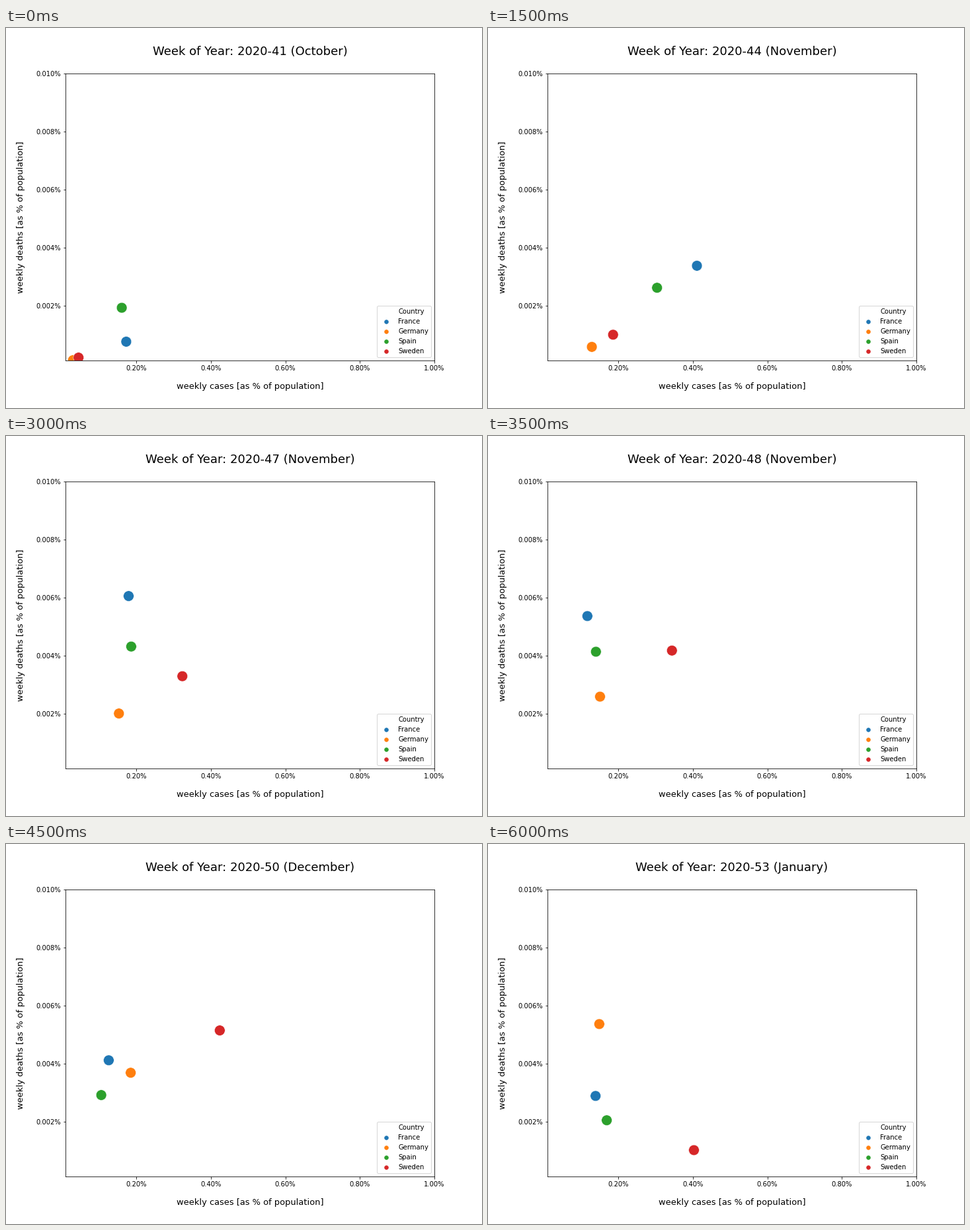
Write a matplotlib script that moves like this. It is 720 by 576 pixels and loops after 6500 ms.

```python
import numpy as np
import matplotlib.pyplot as plt
from matplotlib.animation import FuncAnimation
from matplotlib.ticker import FormatStrFormatter

plt.rcParams["font.family"] = "DejaVu Sans"

FIRST_WEEK, WEEKS = 41, 13
MONTH_STARTS = {0: "October", 3: "November", 8: "December", 12: "January"}
EDGE = .48

# Key points of each path: cases in %, deaths in thousandths of a %
KEY_WEEKS = [0, 3, 5, 7, 9, 11, 12]
PATHS = {
    "France": ([.173, .411, .290, .117, .126, .133, .139],
               [.75, 3.37, 6.13, 5.36, 4.11, 3.82, 2.88]),
    "Germany": ([.030, .129, .156, .151, .185, .170, .149],
                [.11, .57, 1.44, 2.58, 3.68, 4.64, 5.36]),
    "Spain": ([.161, .304, .246, .140, .106, .128, .169],
              [1.92, 2.61, 4.07, 4.13, 2.91, 1.84, 2.04]),
    "Sweden": ([.045, .186, .295, .344, .424, .382, .403],
               [.20, .99, 2.38, 4.17, 5.14, 2.32, 1.01]),
}
COLORS = ["tab:blue", "tab:orange", "tab:green", "tab:red"]

# key week x country x (cases, deaths); growth is exponential, so use logs
log_keys = np.log(np.array(list(PATHS.values())).transpose(2, 0, 1))
log_slopes = np.gradient(log_keys, KEY_WEEKS, axis=0)


def positions(week):
    """Smooth cubic path through the key points, in log space."""
    i = min(np.searchsorted(KEY_WEEKS, week, side="right"), len(KEY_WEEKS) - 1)
    span = KEY_WEEKS[i] - KEY_WEEKS[i - 1]
    t = (week - KEY_WEEKS[i - 1]) / span
    ease = t * t * (3 - 2 * t)
    level = log_keys[i - 1] * (1 - ease) + log_keys[i] * ease
    bend = log_slopes[i - 1] * (1 - t) - log_slopes[i] * t
    return np.exp(level + span * t * (1 - t) * bend) * [1, .001]


def month(week):
    return MONTH_STARTS[max(start for start in MONTH_STARTS if start <= week)]


fig, ax = plt.subplots(figsize=(10, 8), dpi=72)
fig.subplots_adjust(left=.125, right=.9, bottom=.125, top=.88)

ax.set_xlim(.01, 1)
ax.set_ylim(.0001, .01)
ax.set_xticks(np.arange(1, 6) * .2)
ax.set_yticks(np.arange(1, 6) * .002)
ax.xaxis.set_major_formatter(FormatStrFormatter("%.2f%%"))
ax.yaxis.set_major_formatter(FormatStrFormatter("%.3f%%"))
ax.set_xlabel("weekly cases [as % of population]", fontsize=13, labelpad=16)
ax.set_ylabel("weekly deaths [as % of population]", fontsize=13, labelpad=16)
title = ax.set_title("", fontsize=18, pad=28)

dots = ax.scatter(*positions(0).T, s=250, c=COLORS,
                  edgecolors="white", linewidths=EDGE)

ax.scatter([], [], s=0, color="white", label="Country")
for name, color in zip(PATHS, COLORS):
    ax.scatter([], [], color=color, linewidths=EDGE, label=name)
ax.legend(loc="lower right")


def draw(week):
    dots.set_offsets(positions(week))
    title.set_text(f"Week of Year: 2020-{FIRST_WEEK + week} ({month(week)})")
    return dots, title


anim = FuncAnimation(fig, draw, frames=WEEKS, interval=500,
                     repeat=True, repeat_delay=0)
plt.show()
```
